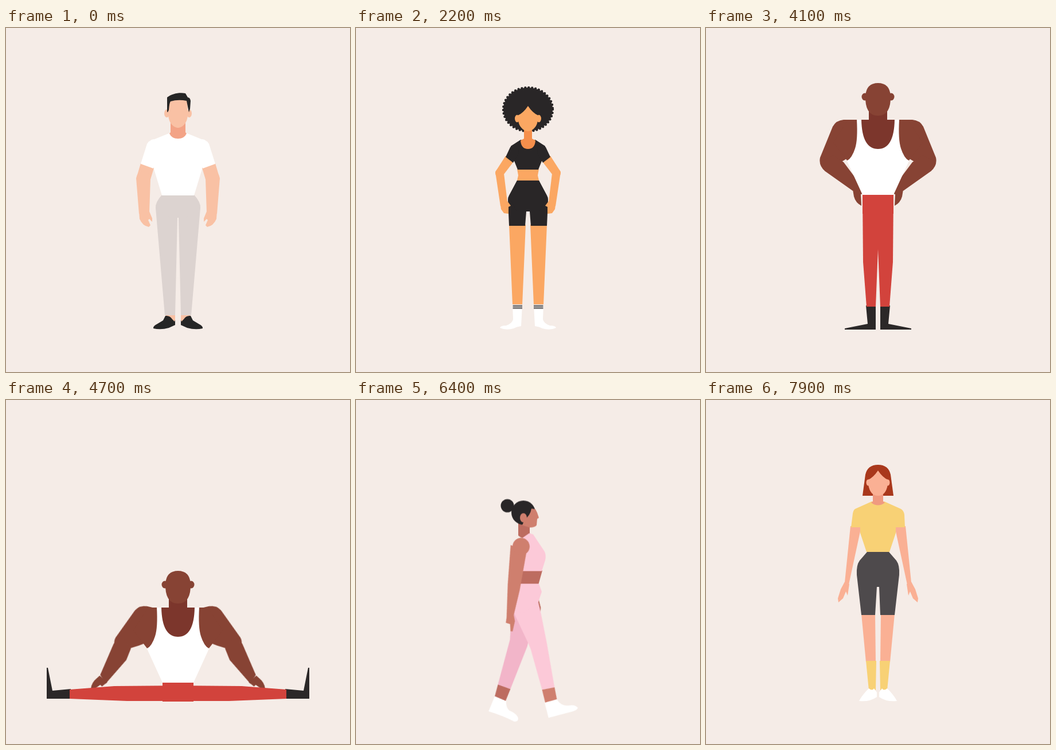
Animation, 600 px wide and 600 px high, one loop 8000 ms. Source, as an HTML page:

```html
<!DOCTYPE html>
<html lang="en">
<head>
<meta charset="utf-8">
<title>Splits</title>
<style>
html, body { margin: 0; width: 100%; height: 100%; overflow: hidden; background: #f5ece7; }
svg { display: block; width: 100vw; height: 100vh; }

/* --t: start of an actor's turn; --s, --m, --r: standing, seated and raised values */
.actor { animation: turn 8s step-end var(--t) infinite; }
.last { animation-name: lastTurn; }
.sink { animation: sink 8s linear var(--t) infinite; }
.bend { animation: bend 8s linear var(--t) infinite; }
.title { animation: pop 8s step-end var(--t) infinite; }
.brush { animation: wipe 8s linear var(--t) infinite; fill: none; stroke: #000;
  stroke-width: 9; stroke-linecap: round; stroke-linejoin: round; }
.outline { font: 900 82px Inter, Roboto, sans-serif; letter-spacing: 9px; text-anchor: middle;
  fill: #f5ece7; stroke: #000; stroke-width: 5; paint-order: stroke; }

@keyframes turn { 0% { visibility: visible } 24.625%, 100% { visibility: hidden } }
@keyframes lastTurn { 0% { visibility: visible } 1.5%, 100% { visibility: hidden } }
@keyframes sink {
  0% { transform: translateY(var(--s)) }
  4.69% { transform: translateY(var(--s)); animation-timing-function: cubic-bezier(.65,0,.35,1) }
  8.74%, 100% { transform: translateY(var(--m)) }
}
@keyframes bend {
  0% { transform: rotate(var(--s)) }
  4.69% { transform: rotate(var(--s)); animation-timing-function: cubic-bezier(.65,0,.35,1) }
  8.74% { transform: rotate(var(--m)); animation-timing-function: cubic-bezier(.45,0,.3,1) }
  12.6%, 100% { transform: rotate(var(--r)) }
}
@keyframes pop { 0% { opacity: 0 } 12.9%, 100% { opacity: 1 } }
@keyframes wipe {
  0%, 12.9% { clip-path: inset(-5% 105% -5% -5%) }
  14.6%, 100% { clip-path: inset(-5% -5% -5% -5%) }
}
</style>
</head>
<body>
<svg id="stage" viewBox="0 0 600 600"></svg>
<script>
const path = (d, fill) => `<path d="${d}" fill="${fill}"/>`;
const poly = (points, fill) => `<polygon points="${points}" fill="${fill}"/>`;
const oval = (x, y, rx, ry, fill) => `<ellipse cx="${x}" cy="${y}" rx="${rx}" ry="${ry}" fill="${fill}"/>`;
const both = half => half + `<g transform="matrix(-1 0 0 1 600 0)">${half}</g>`;
const joint = (x, y, [s, m, r], body) =>
  `<g class="bend" style="transform-origin:${x}px ${y}px;--s:${s}deg;--m:${m}deg;--r:${r}deg">${body}</g>`;
const leg = (x, y, body) => both(joint(x, y, [0, 90, 90], body));

// Hand lettering, one brush path per letter
const glyphs = {
  H: "M2 0L0 54M22 0L20 54M-2 30L26 24",
  A: "M-2 56L12 0L20 54M2 36L22 32",
  N: "M0 56L3 4L18 50L22 -2",
  D: "M3 2L0 52M-4 4Q26 4 23 28Q20 50 0 53",
  O: "M16 2Q0 8 0 34Q2 54 12 52Q25 44 24 20Q23 2 14 4",
  V: "M0 2L8 54L24 -2",
  E: "M20 2L4 4L0 53L20 50M2 29L18 26",
  R: "M3 2L0 56M-4 5Q24 -2 22 14Q18 28 2 32L24 58"
};
const lettering = [..."HANDOVER"].map((c, i) =>
  `<path d="${glyphs[c]}" transform="translate(${180 + 32 * i} ${181 - i % 2}) skewX(-8)"/>`).join("");
const title = `<g class="title"><text class="outline" x="308" y="156">EZK</text>
  <g class="brush" role="img" aria-label="HANDOVER">${lettering}</g></g>`;

const actor = (i, from, to, body) =>
  `<g class="actor" style="--t:${(i * 1.97 - 8).toFixed(2)}s">
    <g class="sink" style="--s:${from}px;--m:${to}px">${body}</g>${title}</g>`;

function whiteShirt() {
  const skin = "#f9c1a4", pants = "#dcd3d0", dark = "#262626", white = "#fff";
  const hand = path("M232 320L233 333Q238 345 249 347L252 344L248 335L250 333L255 338L255 332L250 320Z", skin);
  const fore = poly("227,262 252,262 250,322 232,324", skin) + hand;
  const upper = poly("235,236 258,244 252,264 227,263", skin) + oval(239.5, 262, 12, 12, skin) +
    joint(239, 262, [0, 23, 42], fore) +
    poly("256,195 249,198 246,202 235,237 257,245 270,206", white) + oval(258, 204, 10, 10, white);
  return leg(280, 312,
      poly("278,499 295,499 295,512 280,508", skin) +
      path("M272 291H300V331H299L295 501H277L261 314Q260 304 272 291Z", pants) +
      path("M257 524Q256 520 264 516L274 510L278 502Q286 501 290 508L294 512L295 509V518L284 523Q270 527 257 524Z", dark)) +
    poly("272,291 328,291 332,318 314,331 286,331 268,318", pants) +
    poly("286,183 314,183 346,196 342,246 328,292 272,292 258,246 254,196", white) +
    path("M287 160H313V182L315 184Q311 193 300 193Q289 193 285 184L287 182Z", "#f3a386") +
    both(oval(280.5, 149, 4.5, 7, skin)) +
    path("M284 122H316L317 150C317 165 308 174 300 174C292 174 283 165 283 150Z", skin) +
    path("M281 146V121C290 114 303 112 313 114L317 121Q321 121 322 127L321 141L319 147L315 127Q300 124 287 128Q285 130 284 143L282 147Z", dark) +
    both(joint(258, 203, [0, 10, 113], upper));
}

function blackOutfit() {
  const skin = "#fba762", dark = "#292627";
  const hand = poly("252,308 264,302 270,310 266,312 266,324 258,323 253,316", skin);
  const upper = poly("261,223 275,233 258,255 243,251", skin) + oval(250.5, 253, 7.5, 7.5, skin) +
    joint(250, 253, [0, 30, 59], poly("243,251 258,254 264,303 252,311", skin) + hand) +
    poly("272,205 269,208 261,225 274,235 283,220 285,203", dark);
  const stripes = [484, 486.5, 489].map(y => `<path d="M273.500 ${y}H290" stroke="${dark}" stroke-width="1.300"/>`).join("");
  return leg(282, 304,
      poly("267,343 296,343 290,483 273,483", skin) +
      path("M273 482H290L288 520Q280 521 275 524Q262 528 251 523Q252 519 262 519Q273 515 274 508Z", "#fff") + stripes +
      path("M281 266H300V320H297L295 345H267L265 300Q265 295 267 292Z", dark)) +
    poly("281,266 319,266 333,293 320,320 280,320 267,293", dark) +
    poly("281,246 319,246 317,257 319,266 281,266 283,257", skin) +
    poly("287,195 313,195 330,206 324,232 318,247 282,247 276,232 270,206", dark) +
    `<ellipse cx="300" cy="142" rx="43" ry="38" fill="${dark}" stroke="${dark}" stroke-width="4.500" stroke-linecap="round" stroke-dasharray="0 6"/>` +
    path("M293 172H307V193L313 196Q312 211 300 211Q288 211 287 196L293 193Z", "#f58f4c") +
    both(oval(281, 158, 4, 6.5, skin)) +
    path("M300 136Q292 148 283 152Q281 170 293 178Q300 182 307 178Q319 170 317 152Q308 148 300 136Z", skin) +
    both(joint(273, 210, [0, 5, 103], upper));
}

function redTrousers() {
  const skin = "#874334", deep = "#7c362c", red = "#d2433c", white = "#fff";
  const hand = joint(265, 281, [0, -20, -37],
    path("M256 282L273 277L274 289L270 290L271 310Q261 305 258 294Z", skin));
  const fore = path("M199 234L208 250L256 284L273 278L240 234L222 222Z", skin) + hand;
  const upper = path("M266 160H240Q227 161 221 172L199 226Q196 240 208 250L242 230Q266 218 266 160Z", skin) +
    joint(213, 236, [0, 60, 111], fore);
  return both(joint(253, 185, [0, 5, 94], upper)) +
    leg(287, 310,
      path("M279 484H296V526H242V524L282 516Z", "#2b2828") +
      path("M273 291H300V386L296 486H280L274 408Z", red)) +
    poly("273,290 327,290 327,324 273,324", red) +
    both(poly("268,160 248,160 222,200 246,231 272,220", skin)) +
    path("M268 160H332V215H268Z", deep) +
    path("M263 160H271Q272 211 300 211Q328 211 329 160H337Q335 195 340 210Q345 226 354 232L327 291H273L246 232Q255 226 260 210Q265 195 263 160Z", white) +
    path("M284 142H316V161H284Z", deep) +
    both(oval(277, 120, 5.5, 6.5, skin)) +
    path("M278 118Q280 96 300 96Q320 96 322 118Q323 153 300 153Q277 153 278 118Z", skin);
}

// Side view, drawn seated
function pinkOutfit() {
  const skin = "#cf7f6e", deep = "#bd6c60", pink = "#fcc9d8", dusk = "#f2b5c9", dark = "#292627", white = "#fff";
  return joint(308, 404, [127, 102, 0],
      path("M310 394L385 343L396 331Q403 327 408 328L404 342L397 352L391 355L357 397L326 415Z", deep)) +
    joint(292, 503, [-95, 0, 0],
      poly("292,484 275,486 218,495 136,491 134,514 213,527 295,527", dusk) +
      poly("137,491 115,490 111,510 134,514", deep) +
      path("M116 490L88 485Q86 510 80 533Q82 541 89 537Q95 532 97 520Q101 513 112 511Z", white)) +
    poly("277,453 325,453 318,478 281,478", deep) +
    joint(292, 503, [87, 0, 0],
      path("M281 478L325 482L378 489L455 501L452 523L378 519L365 520L294 528Q269 522 269 502Q270 488 281 478Z", pink) +
      poly("455,501 477,504 475,525 452,523", skin) +
      path("M476 504Q490 501 493 488Q495 476 502 474Q505 476 505 484L502 528L475 526Z", white)) +
    path("M281 476H319L324 490L318 508L292 527Q270 524 269 503Q269 488 281 476Z", pink) +
    path("M283 368H303V388L309 396Q295 402 283 392Z", deep) +
    path("M273 408L302 388L309 390L329 420Q332 427 330 435L324 454H277Z", pink) +
    oval(264, 340, 11.5, 11.5, dark) +
    oval(292, 352, 21, 21, dark) +
    path("M306 345L313 346L316 352L319 361L316 363L315 374Q312 378 303 378L290 374L294 364Q304 357 306 345Z", skin) +
    oval(292, 361, 6, 8, skin) +
    joint(288, 411, [-127, -102, 0],
      path("M300 397L245 356L197 323L190 317L184 322L173 316L171 319L184 332L194 336L225 368L274 413Z", skin) +
      oval(288, 411, 15, 15, skin));
}

function yellowTop() {
  const skin = "#fab094", yellow = "#f8d175", hair = "#a9381c";
  return both(
      poly("252,220 271,220 249,322 242,318", skin) +
      path("M242 317L250 321L247 341L244 334L239 346L231 353L230 346L235 330Z", skin) +
      poly("271,373 295,373 296,457 279,457", skin) +
      poly("279,455 297,455 296,506 284,506", yellow) +
      path("M267 525Q272 515 284 503Q290 508 293 503L298 510V518Q285 527 267 525Z", "#fff")) +
    path("M281 265H319L332 280Q338 288 337 305L329 375H304L302 326H298L295 375H271L263 305Q262 288 268 280Z", "#4e4a4c") +
    path("M289 177H311L340 190Q345 193 346 200L347 222H331V232L320 265H280L269 232V222H253L256 198Q257 192 260 190Z", yellow) +
    path("M273 167L278 130Q282 113 300 113Q318 113 322 130L327 167Z", hair) +
    path("M291 160H309V177L312 179Q300 188 288 179L291 177Z", "#f09a80") +
    both(oval(283, 144, 3.5, 5.5, skin)) +
    path("M300 123Q292 135 283 139V147Q286 167 300 167Q314 167 317 147V139Q308 135 300 123Z", skin);
}

document.getElementById("stage").innerHTML =
  actor(0, 0, 196, whiteShirt()) +
  actor(1, 0, 207, blackOutfit()) +
  actor(2, 0, 202, redTrousers()) +
  actor(3, -190, 0, pinkOutfit()) +
  `<g class="actor last" style="--t:-.12s">${yellowTop()}</g>`;
</script>
</body>
</html>
```
